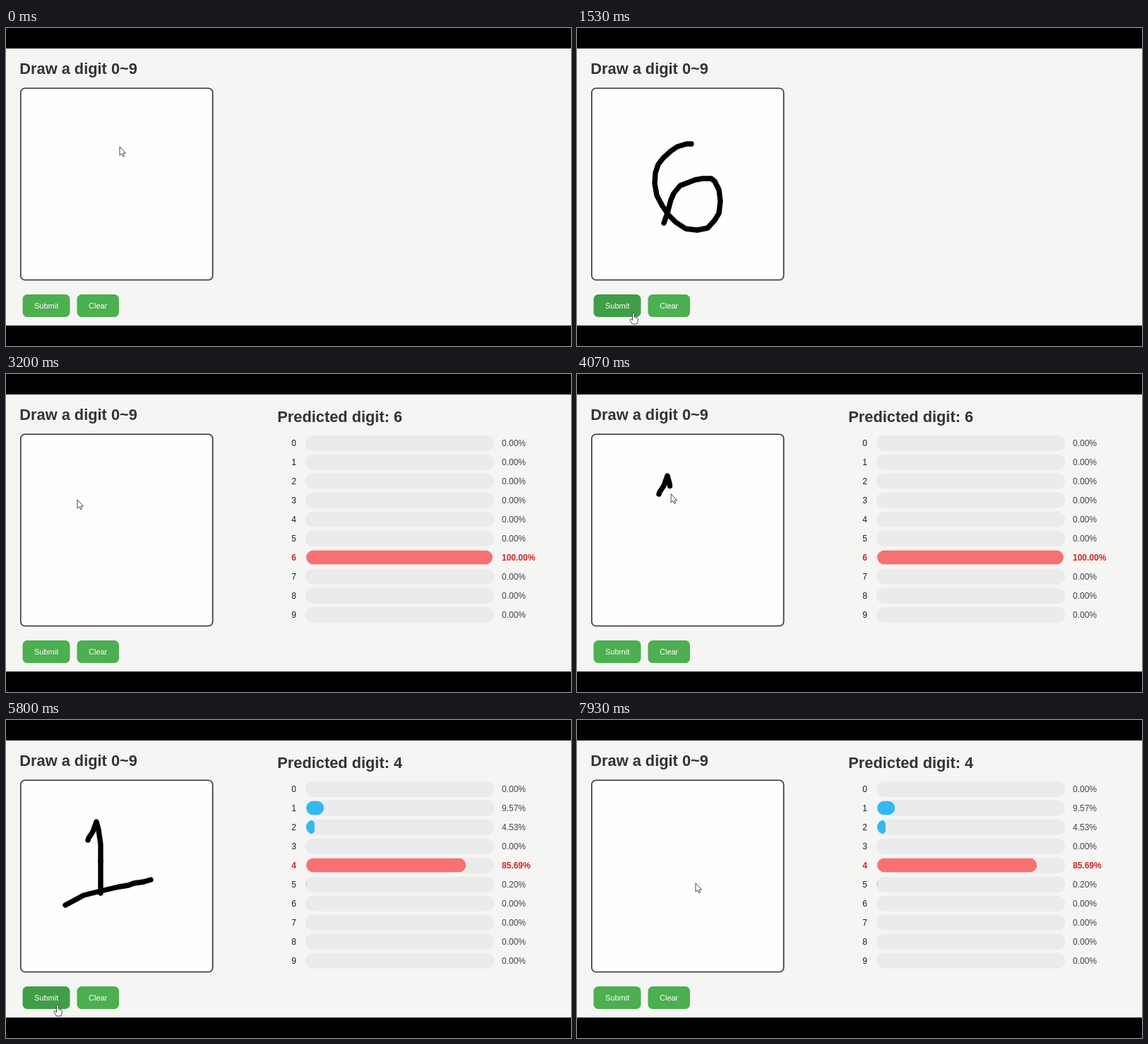
Recreate the animation shown at these times as an HTML page. Size 800 px wide and 450 px high, loop 8000 ms.

```html
<!DOCTYPE html>
<html lang="en">
<head>
<meta charset="utf-8">
<title>Digit recognizer</title>
<style>
html, body { margin: 0; width: 100%; height: 100%; overflow: hidden; background: #000; }
svg { display: block; width: 800px; height: 450px; }
text { font-family: "Liberation Sans", Arial, sans-serif; font-size: 12px; fill: #444; }
.head { font-size: 21.8px; font-weight: bold; fill: #333; }
.digit { fill: #1c1c1c; }
.btn { fill: #4caf50; }
.btn.over { fill: #409e46; }
.label { font-size: 11px; fill: #fff; }
.track { fill: #ebebeb; stroke: #e4e4e4; stroke-width: .6; }
.fill { fill: #34b8f2; }
.best .fill { fill: #f87171; }
.best text { fill: #d62222; font-weight: bold; }
.ink { fill: none; stroke: #000; stroke-width: 7.4; stroke-linecap: round; stroke-linejoin: round; }
.cursor { fill: #fff; stroke: #333; stroke-width: .9; stroke-linejoin: round; }
</style>
</head>
<body>
<svg viewBox="0 0 800 450">
  <defs><clipPath id="pill"><rect x="425" y="-10" width="264" height="20" rx="10"/></clipPath></defs>
  <rect y="29" width="800" height="392" fill="#f5f5f4"/>
  <text class="head" x="19.3" y="65">Draw a digit 0~9</text>
  <rect x="21" y="87" width="273.5" height="271.5" rx="7" fill="#e6e6e6"/>
  <rect x="20.8" y="85.3" width="271.8" height="271.2" rx="6" fill="#fefefd" stroke="#333" stroke-width="1.6"/>
  <rect class="btn" id="submit" x="23.5" y="377" width="67" height="32" rx="6.5"/>
  <rect class="btn" id="clear" x="100.5" y="377" width="59.5" height="32" rx="6.5"/>
  <text class="label" x="40" y="397">Submit</text>
  <text class="label" x="117" y="397">Clear</text>
  <g id="result">
    <text class="head" id="title" x="384.3" y="68.3"></text>
  </g>
  <g id="ink"></g>
  <path class="cursor" id="arrow" d="M0 0V12.3L2.8 9.8L4.7 13.8L6.5 13L4.8 9.1H8.5Z"/>
  <path class="cursor" id="hand" d="M-.5 1Q1 -.8 2.3 1V6L6 7Q7.4 7.4 7.2 9.5V12L5.8 16H-.5L-4 10.5Q-4 8.4 -2.3 9L-.5 10.5Z"/>
</svg>
<script>
const LOOP = 8000, LAG = 97;
const $ = id => document.getElementById(id);

function add(parent, tag, attrs) {
  const el = document.createElementNS("http://www.w3.org/2000/svg", tag);
  for (const k in attrs) el.setAttribute(k, attrs[k]);
  return parent.appendChild(el);
}

// Pointer path: start, end, points, and when the ink is wiped (if it draws).
const moves = [
  [70, 740, "162,164 155,164 142,168 133,174 122,184 115,193 111,205 110,220 113,237 121,252 130,265 140,275 154,284 170,286 185,283 195,272 201,262 203,245 201,229 195,217 190,213 178,213 167,215 146,223 137,234 133,243 128,262 123,276", 2530],
  [740, 870, "123,276 110,374"],
  [870, 1130, "110,374 81,352"],
  [1130, 1470, "81,352 79,403"],
  [1800, 2130, "79,403 90,401"],
  [2130, 2470, "90,401 152,402"],
  [2870, 3200, "152,402 101,178"],
  [3200, 3330, "101,178 97,171"],
  [3530, 3600, "97,171 116,170"],
  [3600, 4330, "116,170 117,167 123,158 128,144 131,155 134,176 134,200", 7270],
  [4330, 4480, "134,200 134,245", 7270],
  [4480, 4630, "134,245 84,262"],
  [4630, 4968, "84,262 110,248 134,242 160,236 173,234 181,231 195,229 205,226", 7270],
  [4968, 5470, "205,226 72,403"],
  [6600, 7130, "72,403 126,402"],
  [7330, 7930, "126,402 168,231"]
].map(([start, end, points, wipe]) => {
  const el = add($("ink"), "polyline", { class: "ink", points, visibility: "hidden" });
  return { start, end, wipe, el, len: el.getTotalLength() };
});

// Predictions: moment, best digit, percentage per digit.
const results = [
  { at: 1660, best: 6, pct: { 6: 100 } },
  { at: 5790, best: 4, pct: { 1: 9.57, 2: 4.53, 4: 85.69, 5: .2 } }
];

const rows = [...Array(10).keys()].map(i => {
  const g = add($("result"), "g", { transform: `translate(0 ${97.5 + 27 * i})` });
  add(g, "rect", { class: "track", x: 424.3, y: -10.3, width: 266.4, height: 21, rx: 10.3 });
  const clip = add(g, "g", { "clip-path": "url(#pill)" });
  const fill = add(clip, "rect", { class: "fill", x: 425, y: -10, height: 20 });
  add(g, "text", { class: "digit", x: 404.2, y: 4 }).textContent = i;
  return { g, fill, value: add(g, "text", { x: 702, y: 4 }) };
});

const progress = (t, start, end) => Math.min(1, Math.max(0, (t - start) / (end - start)));
const show = (el, on) => el.setAttribute("visibility", on ? "visible" : "hidden");

function drawInk(t) {
  for (const m of moves) {
    if (!m.wipe) continue;
    const p = progress(t - LAG, m.start, m.end);
    show(m.el, p > 0 && t < m.wipe);
    m.el.setAttribute("stroke-dasharray", `${p * m.len} 9999`);
  }
}

function drawResult(t) {
  const now = results.filter(r => t >= r.at).pop();
  $("result").style.display = now ? "" : "none";
  if (!now) return;
  $("title").textContent = `Predicted digit: ${now.best}`;
  rows.forEach((row, i) => {
    const pct = now.pct[i] || 0, w = pct * 2.64;
    row.fill.setAttribute("width", w);
    row.fill.setAttribute("rx", Math.min(10, w / 2));
    row.value.textContent = pct.toFixed(2) + "%";
    row.g.setAttribute("class", i === now.best ? "best" : "");
  });
}

function drawCursor(t) {
  const m = moves.filter(m => t >= m.start).pop();
  const { x, y } = m ? m.el.getPointAtLength(progress(t, m.start, m.end) * m.len) : { x: 161, y: 168 };
  let over = false;
  for (const id of ["submit", "clear"]) {
    const b = $(id).getBBox();
    const hit = x > b.x && x < b.x + b.width && y > b.y && y < b.y + b.height;
    $(id).classList.toggle("over", hit);
    over = over || hit;
  }
  for (const id of ["arrow", "hand"]) {
    $(id).setAttribute("transform", `translate(${x} ${y})`);
    show($(id), over === (id === "hand"));
  }
}

const t0 = performance.now();
function frame() {
  const t = (performance.now() - t0) % LOOP;
  drawInk(t);
  drawResult(t);
  drawCursor(t);
  requestAnimationFrame(frame);
}
frame();
</script>
</body>
</html>
```
